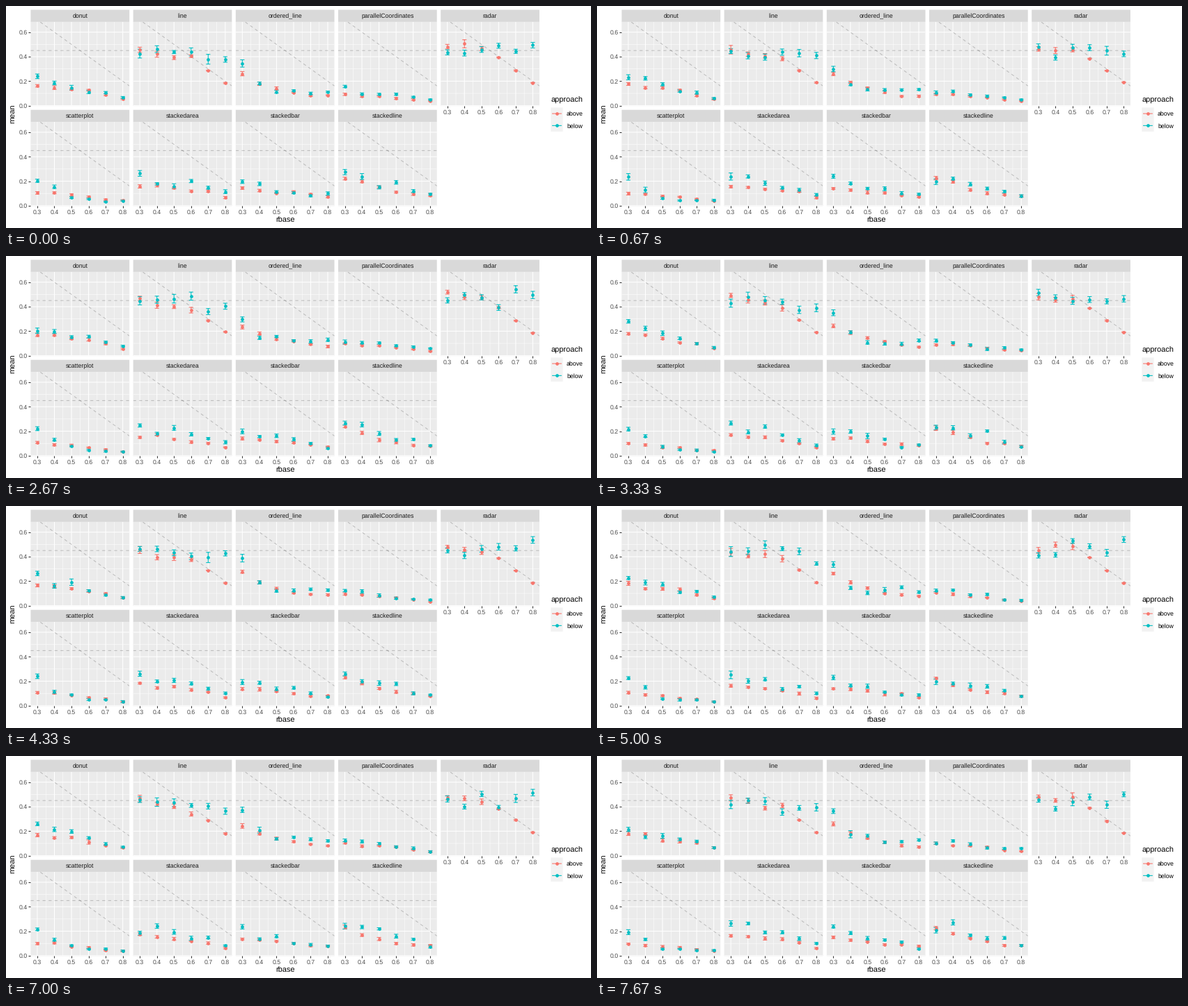
Write a matplotlib script that moves like this. It is 840 by 320 pixels and loops after 8 s.

```python
import numpy as np
import matplotlib.pyplot as plt
from matplotlib.animation import FuncAnimation
from matplotlib.patches import Rectangle

WIDTH, HEIGHT, DPI = 840, 320, 72  # at 72 dpi one point is one pixel
FRAMES, LOOP_MS = 24, 8000
COLORS = {"above": "#F8766D", "below": "#00BFC4"}
THIN, LINE = 0.53, 1.07
PANEL_W, PANEL_H, STRIP_H = 141.71, 121.3, 17.4
LEFT, TOP, STEP_X, STEP_Y = 35.45, 5.5, 147.19, 144.2
LEGEND_X, KEY = 782.31, 17.28
CAP = 0.0125
RBASE = np.arange(3, 9) / 10
X_MIN, X_MAX = 0.26125, 0.83875

# Each group falls from start to end, faster at first for a larger power.
PANELS = {
    "donut": {"above": (.174, .06, .7), "below": (.23, .07, 1)},
    "line": {"above": (.465, .36, 2), "below": (.45, .39, 1)},
    "ordered_line": {"above": (.25, .08, 2), "below": (.36, .12, 6)},
    "parallelCoordinates": {"above": (.1, .037, .9), "below": (.127, .047, 1)},
    "radar": {"above": (.488, .38, .9), "below": (.45, .475, 1)},
    "scatterplot": {"above": (.106, .038, 1), "below": (.22, .04, 3)},
    "stackedarea": {"above": (.164, .065, .5), "below": (.235, .1, .7)},
    "stackedbar": {"above": (.143, .08, 1.2), "below": (.21, .077, 1.2)},
    "stackedline": {"above": (.23, .08, 1.8), "below": (.25, .084, .8)},
}

plt.rcParams.update({
    "font.family": "Liberation Sans",
    "font.size": 8.8,
    "text.hinting": "no_hinting",
    "path.snap": False,
    "lines.solid_capstyle": "butt",
    "axes.axisbelow": True,
})
fig = plt.figure(figsize=(WIDTH / DPI, HEIGHT / DPI), dpi=DPI, facecolor="white")
stage = fig.add_axes([0, 0, 1, 1])
stage.set(xlim=(0, WIDTH), ylim=(HEIGHT, 0))
stage.axis("off")


def box(x, y, w, h, color):
    stage.add_patch(Rectangle((x, y), w, h, facecolor=color, edgecolor="none"))


def label(x, y, text, **style):
    stage.text(x, y, text, va="baseline", **style)


def marker_style(color):
    return dict(color=color, marker="o", markersize=3.9, markeredgewidth=0.7)


def make_panel(index, name):
    row, col = divmod(index, 5)
    x, y = LEFT + col * STEP_X, TOP + row * STEP_Y
    box(x, y, PANEL_W, STRIP_H, "#D9D9D9")
    label(x + PANEL_W / 2, y + 11.5, name, ha="center", color="#1A1A1A")

    y += STRIP_H
    ax = fig.add_axes([x / WIDTH, 1 - (y + PANEL_H) / HEIGHT,
                       PANEL_W / WIDTH, PANEL_H / HEIGHT], facecolor="#EBEBEB")
    ax.set(xlim=(X_MIN, X_MAX), ylim=(-0.003, 0.684))
    ax.set_autoscale_on(False)
    for spine in ax.spines.values():
        spine.set_visible(False)

    y_ticks = np.arange(4) / 5
    ax.set_xticks(RBASE, [f"{v:.1f}" for v in RBASE])
    ax.set_yticks(y_ticks, [f"{v:.1f}" for v in y_ticks])
    ax.set_xticks(RBASE[:-1] + 0.05, minor=True)
    ax.set_yticks(y_ticks[:-1] + 0.1, minor=True)
    ax.grid(which="major", color="white", linewidth=LINE)
    ax.grid(which="minor", color="white", linewidth=THIN)
    ax.tick_params(which="minor", length=0)
    ax.tick_params(which="major", length=2.74, width=LINE, pad=2.2,
                   color="#333333", labelcolor="#4D4D4D", labelsize=8.8)
    has_x_axis = row == 1 or col == 4
    ax.tick_params(axis="x", bottom=has_x_axis, labelbottom=has_x_axis)
    ax.tick_params(axis="y", left=col == 0, labelleft=col == 0)

    guide = dict(color="black", alpha=0.2, linewidth=LINE, linestyle=(0, (4, 4)))
    ax.plot([X_MIN, X_MAX], [0.45, 0.45], **guide)
    ax.plot([X_MIN, X_MAX], [1 - X_MIN, 1 - X_MAX], **guide)

    artists = {}
    for group, color in COLORS.items():
        bars, = ax.plot([], [], color=color, linewidth=LINE, zorder=3)
        dots, = ax.plot([], [], linestyle="none", zorder=4, **marker_style(color))
        artists[group] = bars, dots
    return artists


def draw_legend():
    label(LEGEND_X, 139, "approach", fontsize=11)
    for i, (group, color) in enumerate(COLORS.items()):
        y = 155.1 + KEY * i
        box(LEGEND_X, y - KEY / 2, KEY, KEY, "#F2F2F2")
        stage.plot([LEGEND_X + 0.1 * KEY, LEGEND_X + 0.9 * KEY], [y, y],
                   color=color, linewidth=LINE)
        stage.plot([LEGEND_X + KEY / 2], [y], **marker_style(color))
        label(LEGEND_X + KEY + 5.48, y + 3.1, group)


def error_bars(mean, error):
    """I-shaped bars as one line broken by gaps."""
    low, high, gap = mean - error, mean + error, np.full_like(mean, np.nan)
    left, right = RBASE - CAP, RBASE + CAP
    xs = [left, right, gap, RBASE, RBASE, gap, left, right, gap]
    ys = [high, high, gap, high, low, gap, low, low, gap]
    return np.transpose(xs).ravel(), np.transpose(ys).ravel()


def sample(rng, name, group):
    start, end, power = PANELS[name][group]
    average = end + (start - end) * np.linspace(1, 0, 6) ** power
    error = np.minimum(0.003 + 0.06 * average, 0.024)
    if group == "above":
        error *= 0.85
        # The diagonal is a ceiling; points that reach it hardly vary.
        ceiling = 0.987 - RBASE
        error[average > ceiling] = 0.004
        average = np.minimum(average, ceiling)
    spread = error * (1.5 if group == "below" else 0.9)
    mean = average + spread * np.clip(rng.standard_normal(6), -2, 2)
    error = error * np.exp(0.25 * rng.standard_normal(6))
    return np.maximum(mean, 0.033), error


panels = {name: make_panel(i, name) for i, name in enumerate(PANELS)}
draw_legend()
label(LEFT + (4 * STEP_X + PANEL_W) / 2, 312, "rbase", ha="center", fontsize=11)
label(13, 155, "mean", ha="center", fontsize=11, rotation=90,
      rotation_mode="anchor")


def update(frame):
    rng = np.random.default_rng(40 + frame)
    changed = []
    for name, artists in panels.items():
        for group, (bars, dots) in artists.items():
            mean, error = sample(rng, name, group)
            bars.set_data(*error_bars(mean, error))
            dots.set_data(RBASE, mean)
            changed += [bars, dots]
    return changed


animation = FuncAnimation(fig, update, frames=FRAMES, interval=LOOP_MS / FRAMES,
                          repeat=True, repeat_delay=0, blit=False)
plt.show()
```
